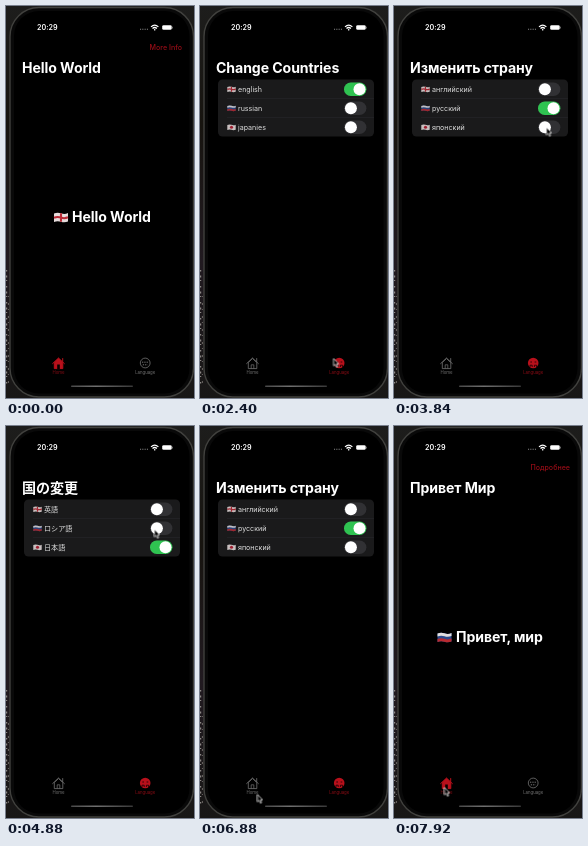
Recreate the animation shown at these times as an HTML page. Size 188 px wide and 392 px high, loop 8000 ms.

```html
<!DOCTYPE html>
<html lang="en">
<head>
<meta charset="utf-8">
<title>Language switcher</title>
<style>
html, body { margin: 0; width: 100%; height: 100%; overflow: hidden; background: #141313; }
svg { display: block; width: 100vw; height: 100vh; font-family: Inter, "Noto Sans CJK JP", "Noto Sans CJK", sans-serif; }
@property --on { syntax: "<number>"; inherits: true; initial-value: 0; }

.title { font-size: 14.1px; font-weight: 650; letter-spacing: -.08px; fill: #fff; }
.row { font-size: 7.1px; fill: #e0e0e0; }
.info { font-size: 7.1px; font-weight: 500; fill: #970c16; text-anchor: end; }
.tab { font-size: 4.3px; text-anchor: middle; fill: currentColor; }
.active { color: #b8101b; }
.idle { color: #747474; }

/* Screens and languages */
.home-en, .settings, .home-ru, .en, .ru, .ja { animation: 8s step-end infinite; }
.home-en { animation-name: home-en; }
.settings { animation-name: settings; }
.home-ru { animation-name: home-ru; }
.en { animation-name: en; }
.ru { animation-name: ru; }
.ja { animation-name: ja; }
@keyframes home-en { 0% { opacity: 1 } 27%, 100% { opacity: 0 } }
@keyframes settings { 0% { opacity: 0 } 27% { opacity: 1 } 95%, 100% { opacity: 0 } }
@keyframes home-ru { 0% { opacity: 0 } 95%, 100% { opacity: 1 } }
@keyframes en { 0% { opacity: 1 } 40.5%, 100% { opacity: 0 } }
@keyframes ru { 0% { opacity: 0 } 40.5% { opacity: 1 } 53.5% { opacity: 0 } 72%, 100% { opacity: 1 } }
@keyframes ja { 0% { opacity: 0 } 53.5% { opacity: 1 } 72%, 100% { opacity: 0 } }

/* Switches: --on is inherited by the reused toggle */
.fill { opacity: var(--on); }
.knob { transform: translateX(calc(var(--on) * 8.6px)); }
.s-en, .s-ru, .s-ja { animation: 8s ease-in-out infinite; }
.s-en { animation-name: s-en; }
.s-ru { animation-name: s-ru; }
.s-ja { animation-name: s-ja; }
@keyframes s-en { 0%, 39.5% { --on: 1 } 42.5%, 100% { --on: 0 } }
@keyframes s-ru { 0%, 39.5% { --on: 0 } 42.5%, 52.5% { --on: 1 } 55.5%, 71.25% { --on: 0 } 74.2%, 100% { --on: 1 } }
@keyframes s-ja { 0%, 52.5% { --on: 0 } 55.5%, 71.25% { --on: 1 } 74.2%, 100% { --on: 0 } }

/* Pointer path */
.pointer { animation: move 8s ease-in-out infinite; }
@keyframes move {
  0%, 11% { transform: translate(190px, 312px) }
  17%, 19% { transform: translate(158px, 352px) }
  24%, 27% { transform: translate(142px, 357.5px) }
  29%, 30% { transform: translate(133.5px, 352.5px) }
  37%, 42% { transform: translate(150px, 102px) }
  48%, 55% { transform: translate(152.5px, 121.5px) }
  61%, 67% { transform: translate(148.5px, 103.5px) }
  69%, 73% { transform: translate(153px, 101.5px) }
  81%, 82% { transform: translate(66px, 375px) }
  83.5% { transform: translate(61px, 377px) }
  86%, 88% { transform: translate(57.5px, 368.5px) }
  90%, 92% { transform: translate(57px, 368px) }
  95.5%, 100% { transform: translate(50.5px, 361.5px) }
}
</style>
</head>
<body>
<svg viewBox="0 0 188 392" preserveAspectRatio="none">
  <defs>
    <linearGradient id="wall" x2="0" y2="1">
      <stop offset="0" stop-color="#1d1d1c"/>
      <stop offset=".3" stop-color="#17140f"/>
      <stop offset=".65" stop-color="#211a20"/>
      <stop offset="1" stop-color="#181716"/>
    </linearGradient>
    <linearGradient id="bar">
      <stop offset="0" stop-color="#484848"/>
      <stop offset=".4" stop-color="#707070"/>
      <stop offset="1" stop-color="#383838"/>
    </linearGradient>
    <path id="cloth" d="M0 1Q3.5 -.6 7 .8T14 .6V9Q10.5 10.400 7 9.200T0 9.400Z"/>
    <g id="england">
      <use href="#cloth" fill="#e6dcdc"/>
      <path d="M7 .8V9.200M0 5.200Q3.500 3.800 7 5.100T14 4.800" fill="none" stroke="#b92a36" stroke-width="2.100"/>
    </g>
    <g id="russia">
      <use href="#cloth" fill="#2b4a8c"/>
      <path d="M0 1Q3.5 -.6 7 .8T14 .6V3.500Q10.500 4.800 7 3.700T0 3.900Z" fill="#e2dede"/>
      <path d="M0 6.500Q3.500 5 7 6.300T14 6.100V9Q10.500 10.400 7 9.200T0 9.400Z" fill="#b92a30"/>
    </g>
    <g id="japan">
      <use href="#cloth" fill="#e6dcdc"/>
      <circle cx="7" cy="5" r="2.600" fill="#b41f32"/>
    </g>
    <g id="toggle">
      <rect x="144" y="-6.800" width="22.400" height="13.600" rx="6.800" fill="#313134"/>
      <rect class="fill" x="144" y="-6.800" width="22.400" height="13.600" rx="6.800" fill="#2fc351"/>
      <circle class="knob" cx="150.900" r="6" fill="#fff"/>
    </g>
    <g id="house" stroke="currentColor" stroke-linejoin="round">
      <path d="M48.300 356.500V362.600H56.800V356.500L52.500 352.500Z"/>
      <path d="M46.600 357.600L52.500 352L58.400 357.600M56.700 355.500V352.500" fill="none" stroke-linecap="round"/>
    </g>
    <g id="home-on" class="active">
      <use href="#house" fill="currentColor"/>
      <rect x="51.200" y="358.500" width="2.600" height="4.500" fill="#080000"/>
      <text class="tab" x="52.500" y="368.300" opacity=".75">Home</text>
    </g>
    <g id="home-off" class="idle">
      <use href="#house" fill="none" stroke-width=".8"/>
      <path d="M51.200 362.500V358.800H53.800V362.500" fill="none" stroke="currentColor" stroke-width=".7"/>
      <text class="tab" x="52.500" y="368.300">Home</text>
    </g>
    <g id="lang-off" class="idle">
      <circle cx="139.200" cy="357" r="4.900" fill="none" stroke="currentColor" stroke-width=".8"/>
      <path d="M136 356.200H142.500M136.800 358.800H141.600" stroke="currentColor" stroke-width="1" stroke-dasharray="1.300 1"/>
      <text class="tab" x="139.200" y="368.300">Language</text>
    </g>
    <g id="lang-on" class="active">
      <circle cx="139.200" cy="357" r="5.300" fill="currentColor"/>
      <path d="M136.300 356H138M140.600 356H142.300M136 361V359.200H138.200V361M140.400 361V359.200H142.600V361" fill="none" stroke="#240205" stroke-width=".9"/>
      <text class="tab" x="139.200" y="368.300" opacity=".75">Language</text>
    </g>
  </defs>

  <!-- Desktop and phone body -->
  <rect width="188" height="392" fill="url(#wall)"/>
  <path d="M.6 264V378" stroke="#8c8886" stroke-width="1.200" stroke-dasharray="1.500 4 2 2.500 1 5"/>
  <path d="M2.400 290V378" stroke="#6c6664" stroke-width="1" stroke-dasharray="1 6 2 4"/>
  <rect x="4" y="1.500" width="183.500" height="389.500" rx="29" fill="#090909" stroke="#41413e" stroke-width="1.400"/>
  <rect x="8" y="5" width="175.500" height="382.500" rx="25"/>

  <!-- Status bar -->
  <text x="31" y="24.200" font-size="7.200" font-weight="600" fill="#fff">20:29</text>
  <path d="M134 23.300H142" stroke="#888" stroke-width="1.100" stroke-dasharray="1.100 1.200"/>
  <g fill="none" stroke="#fff" stroke-width="1.200">
    <path d="M145 20.900Q148.700 17.500 152.400 20.900M146.500 22.500Q148.700 20.500 150.900 22.500"/>
    <path d="M148.700 23V24.500"/>
  </g>
  <rect x="156.200" y="19.200" width="9.500" height="4.600" rx="1.400" fill="#fff"/>
  <rect x="166.200" y="20.700" width=".7" height="1.800" fill="#999"/>

  <g class="home-en">
    <text class="info" x="176" y="44.300">More Info</text>
    <text class="title" x="16" y="66.500">Hello World</text>
    <use href="#england" x="48" y="206.500"/>
    <text class="title" x="66" y="216.200">Hello World</text>
    <use href="#home-on"/>
    <use href="#lang-off"/>
  </g>

  <g class="settings">
    <rect x="18" y="73.500" width="156" height="57" rx="4.500" fill="#1a1a1b"/>
    <path d="M27 92.500H174M27 111.500H174" stroke="#28282a" stroke-width=".6"/>
    <g opacity=".85">
      <use href="#england" transform="translate(27.300 80.300) scale(.6)"/>
      <use href="#russia" transform="translate(27.300 99.300) scale(.6)"/>
      <use href="#japan" transform="translate(27.300 118.300) scale(.6)"/>
    </g>
    <g class="en">
      <text class="title" x="16" y="66.500">Change Countries</text>
      <text class="row" x="38" y="85.700">english</text>
      <text class="row" x="38" y="104.700">russian</text>
      <text class="row" x="38" y="123.700">japanies</text>
    </g>
    <g class="ru" lang="ru">
      <text class="title" x="16" y="66.500">Изменить страну</text>
      <text class="row" x="38" y="85.700">английский</text>
      <text class="row" x="38" y="104.700">русский</text>
      <text class="row" x="38" y="123.700">японский</text>
    </g>
    <g class="ja" lang="ja">
      <text class="title" x="16" y="66.500">国の変更</text>
      <text class="row" x="38" y="85.700">英語</text>
      <text class="row" x="38" y="104.700">ロシア語</text>
      <text class="row" x="38" y="123.700">日本語</text>
    </g>
    <g class="s-en"><use href="#toggle" y="83.200"/></g>
    <g class="s-ru"><use href="#toggle" y="102.200"/></g>
    <g class="s-ja"><use href="#toggle" y="121.200"/></g>
    <use href="#home-off"/>
    <use href="#lang-on"/>
  </g>

  <g class="home-ru" lang="ru">
    <text class="info" x="176" y="44.300">Подробнее</text>
    <text class="title" x="16" y="66.500">Привет Мир</text>
    <use href="#russia" x="43.500" y="206.500"/>
    <text class="title" x="62" y="216.200">Привет, мир</text>
    <use href="#home-on"/>
    <use href="#lang-off"/>
  </g>

  <rect x="65" y="379.500" width="62" height="1.500" rx=".7" fill="url(#bar)"/>

  <path class="pointer" d="M0 0V7.400L1.700 5.900L2.900 8.700L4.200 8.100L3 5.400H5.200Z" fill="#000" stroke="#fff" stroke-width=".7" stroke-linejoin="round"/>
</svg>
</body>
</html>
```
